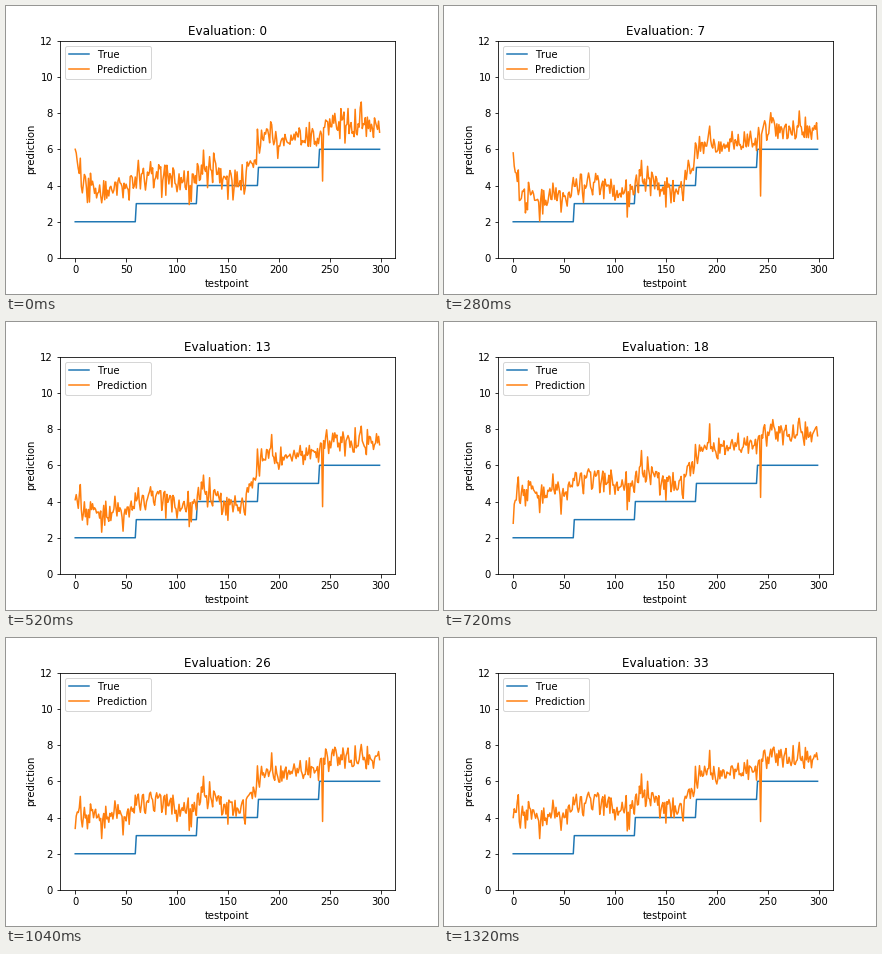
A matplotlib script for the animation above (1.36 s loop, 432 px wide and 288 px high).

```python
import numpy as np
import matplotlib.pyplot as plt
from matplotlib.animation import FuncAnimation

STEPS, POINTS = 34, 300
BLUE, ORANGE = "#1f77b4", "#ff7f0e"

# Settled prediction level: test point -> value
BASE = {0: 4.1, 40: 4.2, 58: 3.9, 61: 5.0, 95: 4.8, 116: 4.1, 124: 5.5,
        156: 4.5, 170: 4.8, 180: 6.3, 238: 6.6, 242: 7.3, 299: 7.2}

# Deviations that every evaluation shares
SPIKES = {5: 1.1, 26: -1.3, 112: -1.0, 150: -1.0, 167: -0.9, 193: 1.3,
          243: -3.5, 281: 0.9}

# How far the lower and upper classes drift, and where the curve starts
KEYS = [0, 3, 7, 13, 18, 26, 33]
LOW = [-0.3, 0.3, -0.8, -0.7, 0.4, 0, 0]
HIGH = [0.1, 0.1, -0.2, 0, 0.5, 0, 0]
START = [6.0, 4.6, 5.8, 4.1, 2.8, 3.4, 4.0]

x = np.arange(POINTS)
truth = 2 + x // 60
upper = np.clip((x - 165) / 15, 0, 1)

rough = 0.42 - 0.1 * upper
shared = np.random.default_rng(12).normal(0, 1, POINTS).clip(-2, 2) * rough
shared[list(SPIKES)] = list(SPIKES.values())
shared[[0, -1]] = 0
base = np.interp(x, list(BASE), list(BASE.values()))


def prediction(step):
    low, high, start = (np.interp(step, KEYS, track)
                        for track in (LOW, HIGH, START))
    level = base + low * (1 - upper) + high * upper
    level += (start - level[0]) * np.exp(-x / 2.5)
    unsettled = 0.06 + 0.22 * np.exp(-step / 12)
    own = np.random.default_rng(100 + step).normal(0, unsettled, POINTS)
    own[0] = 0
    return level + shared + own


# Whole-pixel kerning
plt.rcParams["text.kerning_factor"] = 6

fig, ax = plt.subplots(figsize=(6, 4), dpi=72)
fig.subplots_adjust(left=0.125, right=0.9, bottom=0.125, top=0.88)
ax.plot(x, truth, color=BLUE, label="True")
line, = ax.plot(x, prediction(0), color=ORANGE, label="Prediction")
ax.set_ylim(0, 12)
ax.set_xlabel("testpoint")
ax.set_ylabel("prediction")
ax.legend(loc="upper left")
title = ax.set_title("Evaluation: 0")


def draw(step):
    line.set_ydata(prediction(step))
    title.set_text(f"Evaluation: {step}")
    return line, title


anim = FuncAnimation(fig, draw, frames=STEPS, interval=40, repeat=True,
                     repeat_delay=0, blit=False)
plt.show()
```
